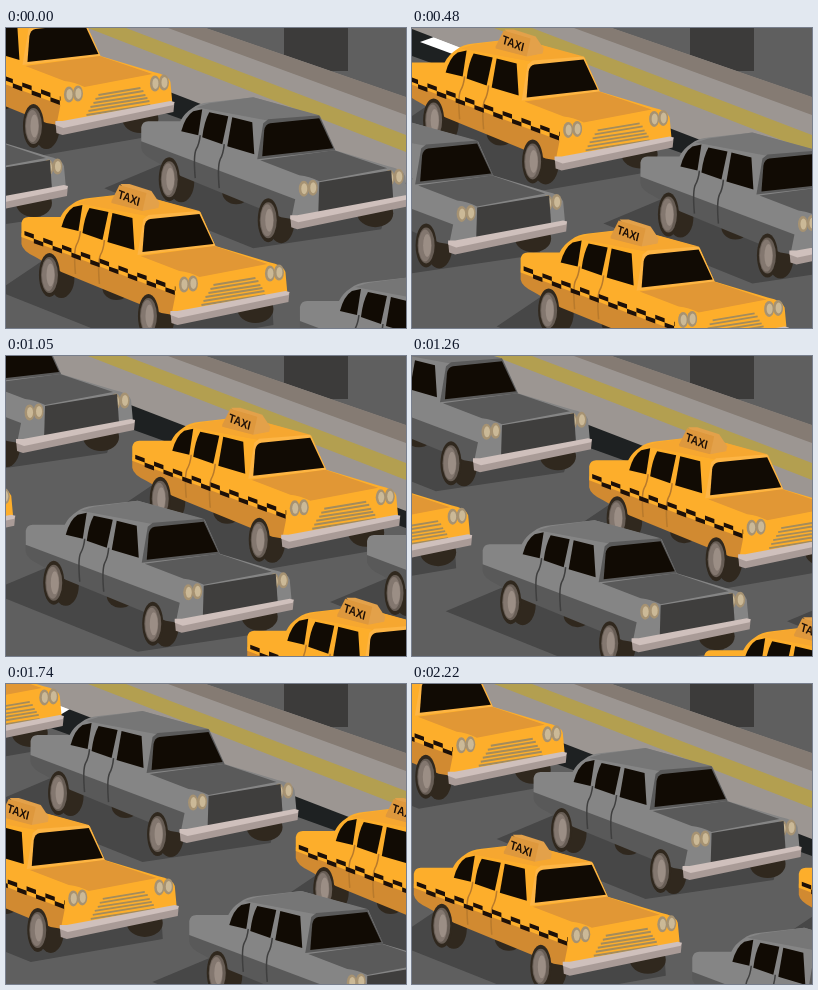
Write an HTML page that moves like this. It is 400x300 px and loops after 2.25 s.

```html
<!DOCTYPE html>
<html lang="en">
<head>
<meta charset="utf-8">
<title>Traffic</title>
<style>
  html, body { margin: 0; width: 100%; height: 100%; overflow: hidden; background: #5f5f5f; }
  svg { display: block; width: 400px; height: 300px; }
  .gray { --side: #858585; --low: #595959; --top: #5a5a5a; --roof: #767676; --frame: #5a5a5a; --seam: #3f3f3f; }
  .taxi { --side: #fdae2b; --low: #d18a31; --top: #e19735; --roof: #f6a730; --frame: #fdb545; --seam: #b87a2c; }
  .side { fill: var(--side); }
  .low { fill: var(--low); }
  .top { fill: var(--top); }
  .roof { fill: var(--roof); }
  .frame { fill: var(--frame); }
  .seam { fill: none; stroke: var(--seam); stroke-width: 1.5; }
  .glass { fill: #110b04; }
  .tire { fill: #30281e; }
  .checks { fill: none; stroke: #1d1008; stroke-width: 4.4; stroke-dasharray: 9.4; }
  .sign { font: bold 12.5px "Liberation Sans", Arial, sans-serif; text-anchor: middle; fill: #1d1008; }
</style>
</head>
<body>
<svg viewBox="0 0 400 300">
  <defs>
    <path id="shadow" d="M-37 66L25 40L250 75L240 107L112 126Z" fill="#474747"/>
    <path id="taxiShadow" d="M-24 73L25 40L250 75L252 107L120 130Z" fill="#474747"/>

    <g id="wheel">
      <ellipse rx="10.5" ry="22" fill="#30281e"/>
      <ellipse rx="8.5" ry="18" fill="#675d55"/>
      <ellipse cx="-1" rx="6.5" ry="16" fill="#83776f"/>
      <ellipse cx="1" rx="4" ry="11.5" fill="#9b8e85"/>
    </g>

    <g id="lamps">
      <ellipse cx="-4.5" cy=".5" rx="5" ry="8" fill="#a69272"/>
      <ellipse cx="4.5" cy="-.5" rx="5" ry="8" fill="#a69272"/>
      <ellipse cx="-4" cy=".5" rx="3" ry="5.5" fill="#cbb997"/>
      <ellipse cx="5" cy="-.5" rx="3" ry="5.5" fill="#cbb997"/>
    </g>

    <g id="car">
      <g class="tire">
        <ellipse cx="95" cy="70" rx="14" ry="12"/>
        <ellipse cx="234" cy="91" rx="18" ry="14"/>
        <ellipse cx="40" cy="60" rx="13" ry="20"/>
        <ellipse cx="140" cy="100" rx="13" ry="21"/>
      </g>
      <path class="low" d="M0 15L157 74L152 97L140 95L118 86L40 54L14 39Q1 33 0 26Z"/>
      <path class="side" d="M0 5Q1 -1 7 -1L39 -1Q43 -9 51 -14Q57 -19 68 -20L112 -25L179 -6L194 28L247 44Q262 47 264 54L266 76L150 97L154 77L0 19Z"/>
      <path class="roof" d="M55 -15L68 -19L112 -25L178 -7L125 -2Z"/>
      <path class="frame" d="M116 37L122 1L127 -3L178 -7L194 28Z"/>
      <path class="top" d="M119 38L193 28L246 46L178 59Q168 54 158 53Z"/>
      <g class="glass">
        <path d="M40 9Q44 -6 52 -11L61 -13L57 13Z"/>
        <path d="M61 15Q63 -1 68 -10L87 -6L81 22Z"/>
        <path d="M86 24L91 -5L111 0L113 32Z"/>
        <path d="M121 34L123 8Q124 2 129 1L178 -4L192 26Z"/>
      </g>
      <path class="seam" d="M59 13Q58 22 55 27Q52 33 54 56M83 22Q82 32 79 37Q76 44 78 66"/>
      <use href="#wheel" x="28" y="57"/>
      <use href="#wheel" x="127" y="98"/>
      <use href="#lamps" x="167" y="66"/>
      <use href="#lamps" x="253" y="55"/>
    </g>

    <g id="bumper">
      <path d="M149 94L162 97L268 74L267 84L156 107L150 105Z" fill="#a99b97"/>
      <path d="M149 93L156 93L264 73L268 74L267 77L157 100L149 97Z" fill="#cfc0bc"/>
    </g>

    <g id="grayCar" class="gray">
      <use href="#car"/>
      <path d="M178 60L250 48L252 77L177 93Z" fill="#3f3e3d"/>
      <use href="#bumper"/>
    </g>

    <g id="taxiCar" class="taxi">
      <use href="#car"/>
      <g transform="skewY(20.2)">
        <path class="checks" d="M3 14H154"/>
        <path class="checks" d="M3 18.4H154" stroke-dashoffset="9.4"/>
      </g>
      <path d="M192 67L234 60M189 71L237 63M187 75L239 67M184 79L241 70M182 83L243 73M180 87L244 77" stroke="#a48c5c" stroke-width="1.9"/>
      <use href="#bumper"/>
      <path d="M99 -34L108 -34L130 -27L138 -15L137 -10L121 -7Z" fill="#e3a14a"/>
      <path d="M90 -17L98 -33L125 -25L121 -7L90 -15Z" fill="#de983d"/>
      <text class="sign" transform="matrix(.78 .31 -.22 .95 106.5 -16)">TAXI</text>
    </g>
  </defs>

  <rect width="400" height="300" fill="#5f5f5f"/>
  <rect x="278" width="64" height="43" fill="#3c3b3a"/>
  <path d="M0 0H200L400 69V172L0 28Z" fill="#1e2122"/>
  <path d="M22 9L64 25L54 31L8 14Z" fill="#fff"/>
  <path d="M0 0H200L400 69V155L0 1Z" fill="#9c9692"/>
  <path d="M162 0H200L400 69V87Z" fill="#857b73"/>
  <path d="M82 0H120L400 107V124Z" fill="#b39f50"/>
  <g id="traffic"></g>
</svg>
<script>
  const LOOP = 2250, STEP = 30, SLOPE = 0.38, GAP = 500;
  const traffic = document.getElementById("traffic");

  // Far lane first, so that nearer cars overlap it.
  const cars = [
    ["taxi", -99.5, 0], ["gray", 135.3, 94.2],
    ["gray", -206, 84], ["taxi", 15.5, 190]
  ].flatMap(([kind, x, y]) => {
    const ahead = kind === "gray" && x < 0 ? 1 : 0;
    return [ahead - 1, ahead].map(n => [kind, x + n * GAP, y + n * GAP * SLOPE]);
  });

  const use = (id, x, y) => `<use href="#${id}" x="${x}" y="${y}"/>`;
  const draw = list =>
    list.map(([kind, x, y]) => use(kind === "taxi" ? "taxiShadow" : "shadow", x, y)).join("") +
    list.map(([kind, x, y]) => use(kind + "Car", x, y)).join("");
  traffic.innerHTML = draw(cars.slice(0, 4)) + draw(cars.slice(4));

  // The flow is fastest mid-loop and slower at both ends.
  function travel(ms) {
    const s = (ms - 1150) / 1000;
    return 250 + 242.7 * s - 19.1 * s ** 3;
  }

  function frame(now) {
    const ms = Math.floor((now % LOOP) / STEP) * STEP;
    const d = travel(ms);
    traffic.setAttribute("transform", `translate(${d} ${d * SLOPE})`);
    requestAnimationFrame(frame);
  }
  frame(performance.now());
</script>
</body>
</html>
```
